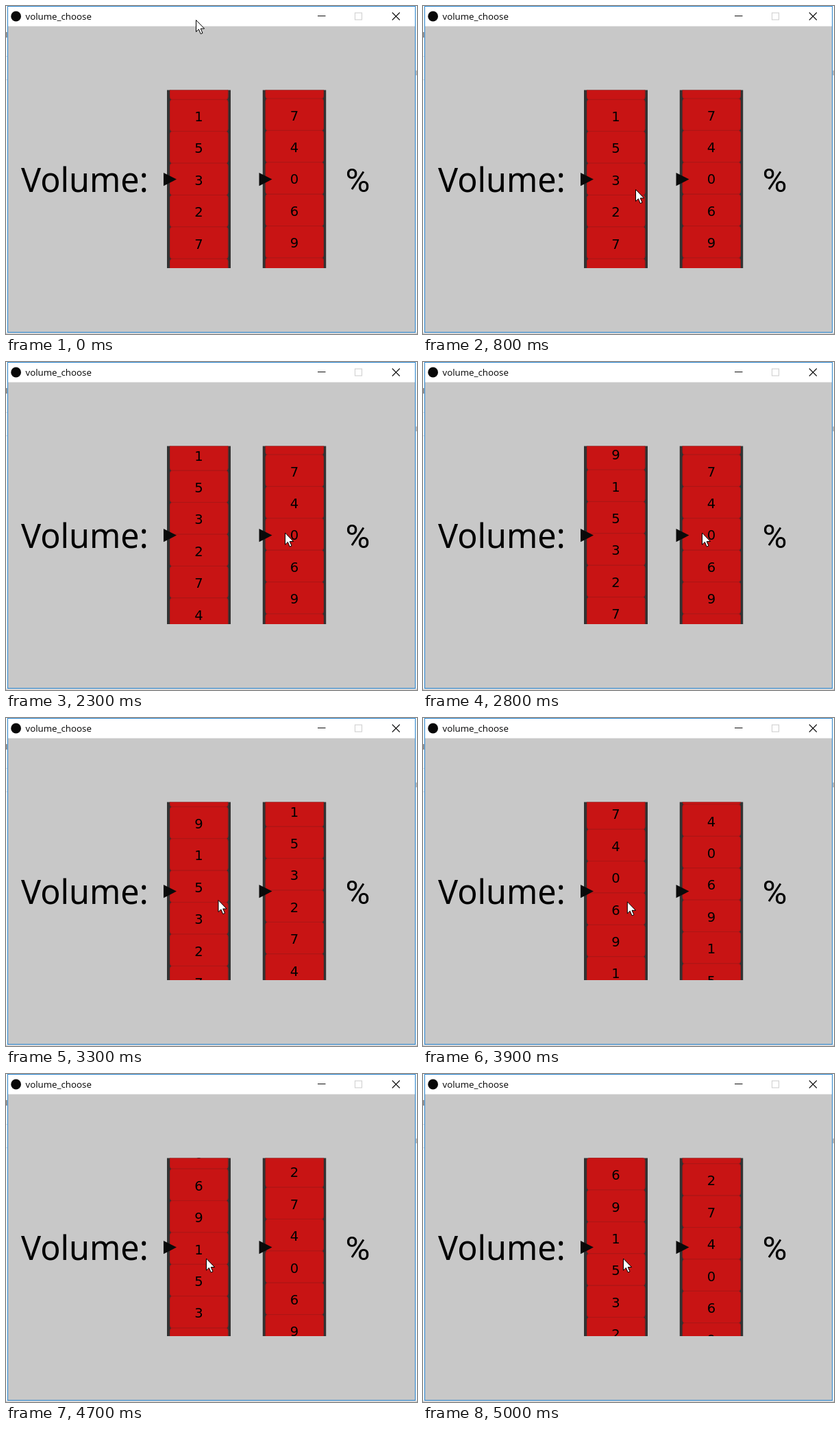
An HTML page that plays this animation: 600 px wide and 478 px high, repeating every 5.1 s.

```html
<!DOCTYPE html>
<html lang="en">
<head>
<meta charset="utf-8">
<title>volume_choose</title>
<style>
  html, body { margin: 0; width: 100%; height: 100%; overflow: hidden; background: #f4f5f7; }
  svg { display: block; width: 600px; height: 478px; }
  .title { font: 13.3px "Open Sans", sans-serif; }
  .label { font: 48.5px "Noto Sans", sans-serif; }
  .percent { font: 49px Roboto, sans-serif; }
  .digit { font: 19.5px "DejaVu Sans", sans-serif; text-anchor: middle; }
  .cell { fill: #c81414; stroke: #ad1616; stroke-width: 1; }
</style>
</head>
<body>
<svg viewBox="0 0 600 478">
  <defs>
    <clipPath id="slot"><rect x="0" y="122.5" width="93" height="259.5"/></clipPath>
  </defs>

  <!-- window -->
  <rect y="476" width="600" height="2" fill="#d5d8db"/>
  <rect y="38" width="1.5" height="8" fill="#777"/>
  <path d="M0 73.5H2M0 107.5H2" stroke="#cfd9e4"/>
  <rect x="598.5" y="94" width="1.5" height="7" fill="#aaa"/>
  <rect x="2.5" y="0.5" width="595" height="475" fill="#c8c8c8" stroke="#2b86cf"/>
  <rect x="3" y="1" width="594" height="28.5" fill="#fff"/>
  <circle cx="14.6" cy="15" r="7.4" fill="#080808"/>
  <text class="title" x="28.5" y="20">volume_choose</text>
  <g fill="none" stroke="#111" stroke-width="1.1">
    <path d="M455 14.5H466.5M563.8 9.5L574.8 20.5M574.8 9.5L563.8 20.5"/>
    <rect x="509.5" y="10" width="10" height="10" stroke="#d0d0d0"/>
  </g>

  <!-- selector -->
  <text class="label" x="22" y="271">Volume:</text>
  <text class="percent" x="495.5" y="271">%</text>
  <g id="reels"></g>
  <path d="M230 243V262.3L249 252.6ZM369.5 243V262.3L388.5 252.6Z" fill="#0a0a0a"/>

  <path id="cursor" d="M.5 .5V17.6L4.4 13.9L7.2 20.6L10 19.4L7.2 13H12.6Z" fill="#fff" stroke="#000" stroke-width="1"/>
</svg>

<script>
const LOOP = 5100, STEP = 100;
const DIGITS = [1, 5, 3, 2, 7, 4, 0, 6, 9];
const CELL = 46.4, TURN = CELL * DIGITS.length;

// Kicks: [start, peak, top speed]; times in steps, speed in px per step
const REELS = [
  { x: 235, y: 161, drag: 5.7, kicks: [[11.1, 14, 65.8], [33.1, 34, -67.3]] },
  { x: 374.5, y: -25.9, drag: 6, kicks: [[28.62, 32, 62.2]] }
];

// Pointer stops: [step, x, y]
const POINTER = [
  [0, 277, 20], [1, 277, 20], [2, 283, 62], [3, 302, 150], [4, 314, 240],
  [5, 319, 266], [6, 319, 266], [8, 310, 267], [10, 297, 265.5],
  [21, 297, 265.5], [23, 407, 248.5], [31, 407, 248.5], [33, 309.5, 265],
  [37, 309.5, 265], [40, 292, 268.5], [51, 292, 268.5]
];

const cursor = document.getElementById("cursor");

function svg(name, attrs, parent, text = "") {
  const el = document.createElementNS("http://www.w3.org/2000/svg", name);
  for (const key in attrs) el.setAttribute(key, attrs[key]);
  el.textContent = text;
  return parent.appendChild(el);
}

function buildReel(reel) {
  const root = svg("g", { transform: `translate(${reel.x} 0)`, "clip-path": "url(#slot)" },
    document.getElementById("reels"));
  svg("rect", { y: 122, width: 93, height: 261, fill: "#323232" }, root);
  reel.strip = svg("g", {}, root);
  [...DIGITS, ...DIGITS].forEach((digit, i) => {
    const y = i * CELL;
    svg("rect", { class: "cell", x: 4.5, y: y - 24.7, width: 84.5, height: CELL, rx: 3.5 }, reel.strip);
    svg("text", { class: "digit", x: 46.5, y: y + 7 }, reel.strip, digit);
  });
}

// Speeds up evenly to the peak, then coasts to a stop
function travel(t, [start, peak, speed], drag) {
  if (t <= start) return 0;
  const rise = peak - start;
  if (t < peak) return speed * (t - start) ** 2 / (2 * rise);
  return speed * (rise / 2 + drag * (1 - Math.exp((peak - t) / drag)));
}

function place(el, x, y) {
  el.setAttribute("transform", `translate(${x.toFixed(2)} ${y.toFixed(2)})`);
}

function drawReel(reel, t) {
  const y = reel.kicks.reduce((sum, kick) => sum + travel(t, kick, reel.drag), reel.y);
  const wrapped = ((y - 100) % TURN + TURN) % TURN + 100 - TURN;
  place(reel.strip, 0, wrapped);
}

function drawPointer(t) {
  const i = POINTER.findIndex(stop => stop[0] > t);
  const [t0, x0, y0] = POINTER[i - 1], [t1, x1, y1] = POINTER[i];
  const k = (t - t0) / (t1 - t0);
  place(cursor, x0 + (x1 - x0) * k, y0 + (y1 - y0) * k);
}

function draw(ms) {
  const t = Math.floor(ms % LOOP / STEP);
  REELS.forEach(reel => drawReel(reel, t));
  drawPointer(t);
}

REELS.forEach(buildReel);
const begin = performance.now();
function tick() {
  draw(performance.now() - begin);
  requestAnimationFrame(tick);
}
tick();
</script>
</body>
</html>
```
